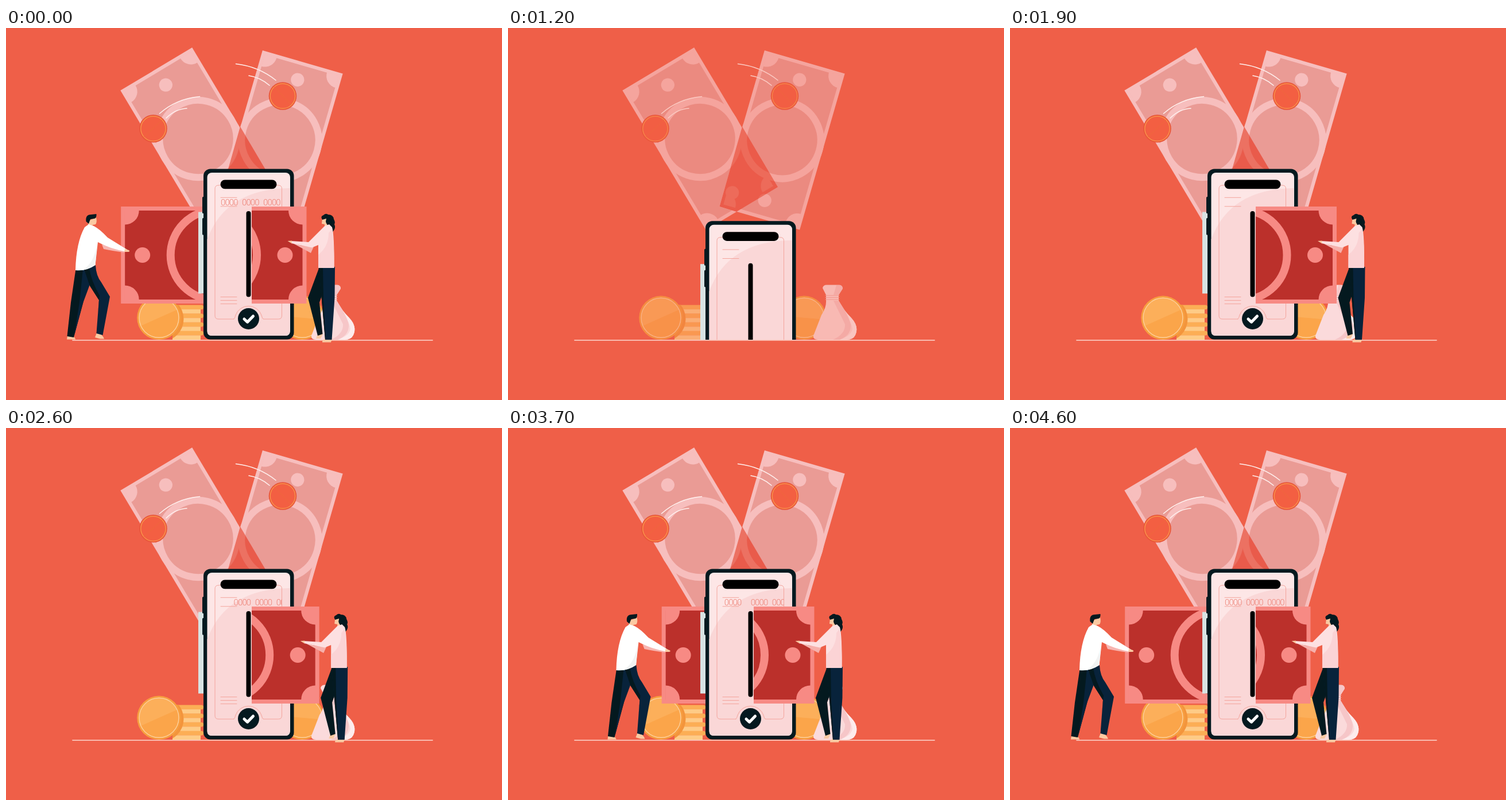
An HTML page that plays this animation: 864x648 px, repeating every 6.7 s.

```html
<!DOCTYPE html>
<html lang="en">
<head>
<meta charset="utf-8">
<title>Mobile cash</title>
<style>
html, body { margin: 0; width: 100%; height: 100%; overflow: hidden; background: #ef5f48; }
svg { display: block; width: 100%; height: 100%; }
text { font: 300 15px Roboto, sans-serif; letter-spacing: -.92px; word-spacing: 4.7px; fill: #ee8478; }
</style>
</head>
<body>
<script>
const INK = '#04191f', NAVY = '#08233b', SKIN = '#fbc9a2';
const CASH = ['#bb302b', '#f78a84'], PALE = ['#ea9b95', '#f7bebd'];

const path = (d, fill) => `<path d="${d}" fill="${fill}"/>`;
const line = (d, color, width = 1) =>
  `<path d="${d}" fill="none" stroke="${color}" stroke-width="${width}" stroke-linecap="round" stroke-linejoin="round"/>`;
const rect = (x, y, w, h, r, fill) =>
  `<rect x="${x}" y="${y}" width="${w}" height="${h}" rx="${r}" fill="${fill}"/>`;
const dot = (x, y, r, fill) => `<circle cx="${x}" cy="${y}" r="${r}" fill="${fill}"/>`;
const ring = (x, y, r, color, width) =>
  `<circle cx="${x}" cy="${y}" r="${r}" fill="none" stroke="${color}" stroke-width="${width}"/>`;

// Banknote centred on the origin
function marks(color) {
  const corners = [[1, 1], [1, -1], [-1, 1], [-1, -1]].map(([sx, sy]) =>
    `<path transform="scale(${sx} ${sy})" d="M-158 -78h25a24.5 24.5 0 0 1 -25 25z" fill="${color}"/>`).join('');
  return ring(0, 0, 78, color, 14) + corners + dot(-127, 0, 13.5, color) + dot(127, 0, 13.5, color);
}
const bill = ([fill, edge]) =>
  rect(-164.5, -84.5, 329, 169, 0, edge) + rect(-157.5, -77.5, 315, 155, 0, fill) + marks(edge);

const LEFT = 'translate(334.5 193) rotate(59.1) scale(.861)';
const RIGHT = 'translate(477.5 195.3) rotate(106.1) scale(.861)';
const at = (place, body) => `<g transform="${place}">${body}</g>`;

const backBills = at(LEFT, bill(PALE)) + at(RIGHT, bill(PALE)) +
  `<g clip-path="url(#cross)">${rect(360, 165, 115, 160, 0, '#e95b4b')}
   <g opacity=".35">${at(LEFT, marks('#f29a90'))}${at(RIGHT, marks('#f29a90'))}</g></g>`;

const flyingCoin = (x, y) => dot(x, y, 24.3, '#e8573a') + dot(x, y, 22.5, '#f35f42') +
  ring(x, y, 21.7, '#fa9a4c', 1.2);

const trails = ['M267.500 149Q297 123 337.500 119.500', 'M279 157Q295 141 315 140',
  'M400.500 62.500Q440 67 470 91', 'M423 83Q443 86 459 100']
  .map(d => line(d, '#fff0ee', 1.6)).join('');

function bigCoin(x, y, tilt) {
  return dot(x, y, 38.3, '#f79e40') + dot(x, y, 35, '#fcaf5a') +
    `<path transform="rotate(${tilt} ${x} ${y})" d="M${x - 35} ${y}a35 35 0 0 0 70 0z" fill="#fba54a"/>` +
    ring(x, y, 34.500, '#fdd09a', 1.4);
}

let stack = '';
for (let i = 0; i < 8; i++)
  stack += rect(290, 482.5 + i * 7.55, i % 2 ? 49 : 54, 7.7, i % 2 ? 0 : 3.5, i % 2 ? '#fecb86' : '#fcae55');
stack += '<g clip-path="url(#stackBox)">' + dot(270.5, 507, 39, '#f3953c') + '</g>';

const bag = path('M548 453Q549 447.500 555 447.500H577Q583 448 583 454L576 465V475Q584 491 598 505Q612 520 605 535Q601 543 590 543H540Q531 543 532 536L546 500Q555 487 554 474V465Z', '#fbdadb') +
  path('M576 475Q584 491 598 505Q612 520 605 535Q601 543 590 543H570Q597 540 600 524Q598 508 580 492Z', '#fdebec') +
  path('M572 448H577Q583 448 583 454L576 465H567ZM567 475L576 475Q598 508 597 520Q596 536 578 543H566Q588 533 587 516Z', '#f6c6c8') +
  line('M553 466H577M553 469.500H577M553 473H577', '#f3a9a7', 1.1);

const THIN = '#f4a49c';
const phone = rect(335, 320.5, 12, 142, 0, '#d8e3e3') +
  rect(342, 294, 6, 29, 1.5, INK) + rect(342, 331, 6, 29.5, 1.5, INK) +
  rect(344, 245.5, 157.5, 297, 12, INK) + rect(350.5, 252, 144.5, 284, 8, '#fde6e6') +
  path('M350.500 368Q383 280 494.500 279V528Q494.500 536 487 536H358Q350.500 536 350.500 528Z', '#fad7d7') +
  line('M397 507H370Q364 507 364 501V280Q364 274 370 274H474.500Q480.500 274 480.500 280V501Q480.500 507 474.500 507H448Q446 505 445 500A24 24 0 0 0 400 500Q399 505 397 507', THIN) +
  rect(373.5, 264.5, 98, 15.7, 7.8, '#000') +
  line('M374 295.300H402M374 310.800H402M374 468.500H402M374 474.500H402M374 480.500H402', THIN) +
  rect(418.5, 319, 8, 149.5, 4, '#000') +
  dot(422.5, 506.5, 18.5, INK) + line('M415 507L420.500 512.200L430.500 502', '#fff', 5);

const man =
  path('M107 536L106 542.500H121Q121 540 117 537ZM158 531L155 539L164 541.500H171Q170 538 166 534Z', SKIN) +
  path('M121.500 420H146L134 480L118 539L106.500 537L113 478Z', INK) +
  path('M134 420H152L146 447L133 482L119 535L128 478Z', NAVY) +
  path('M136 420L156 413Q157 432 166 443L181 468L168.500 535L157.500 532L162 474L146 449Z', NAVY) +
  path('M136 420L145 418Q148 440 163 466L160 500L157.500 532L162 474L146 449Z', INK) +
  path('M167 377L208 388L206 391Q184 388 170 385Z', '#f7b5b0') +
  path('M143 336L157 330Q159 338 156 342L151 343L150 347L143 346Z', SKIN) +
  path('M139.500 337Q138 325 148 325L157.500 324Q158 331 154 332L147 333L144 341Z', INK) +
  path('M144 342L153 345Q163 350 177 365L211 386L210 390Q180 384 160 373L155.500 413Q140 424 121 422Q122 374 137 347Z', '#fff') +
  path('M157 385L159 373L155.500 413Q146 419 133 422Q151 411 157 385Z', '#f2f3f3') +
  path('M207 384.500L214 387Q217 389 213 390L206 390Z', SKIN);

const woman =
  path('M543 533L540 541H548L552 533ZM556 541L551 545.500V547.500H566L568 541Z', SKIN) +
  path('M546 416H562L554 455L546 478L551.500 533L543 536L526 470Z', INK) +
  path('M544.500 416H573L572.500 470L567.500 543H556L550 474Z', NAVY) +
  path('M544.500 416H552L553 474L557 543H556L550 474Z', INK) +
  path('M498 374L519 380L536 381L531 392Z', '#f6b0ab') +
  path('M551 332L561 331L563 346L555 347L555 342L550 341Z', SKIN) +
  path('M551 334Q547 328 553 326Q557 322 561 325Q570 325 571 333Q574 338 572 342Q575 348 570 354Q567 358 565 352Q562 349 565 345Q558 344 557 337L558 332Z', INK) +
  path('M555 345L563 342L568 347Q572 360 571.500 418H544V378L533 382.500L497 375V371L527 373Z', '#fde0e1') +
  path('M562 357Q562 381 544 395V418H571.500Q572 378 568 350Z', '#fbd3d5') +
  path('M490.500 371L498 370.500V375.500Z', SKIN);

document.body.innerHTML = `
<svg viewBox="0 0 864 648" preserveAspectRatio="none">
  <defs>
    <clipPath id="cross"><path d="M408 172L470 277L398 320L368.500 311Z"/></clipPath>
    <clipPath id="stackBox"><rect x="290" y="482" width="54" height="61"/></clipPath>
    <clipPath id="ground"><rect width="864" height="543"/></clipPath>
    <clipPath id="behind"><rect width="350" height="648"/></clipPath>
    <clipPath id="front"><rect x="428" width="436" height="648"/></clipPath>
    <clipPath id="number"><rect x="371.500" y="290" width="109" height="24"/></clipPath>
  </defs>
  <g id="scene">
    ${backBills}${flyingCoin(256.5, 175.3)}${flyingCoin(482, 118.5)}
    ${line('M240 190L272 160M467 102L497 134', '#ee6a3c', .8)}${trails}
    ${stack}${bigCoin(266.5, 504.8, -24)}${bigCoin(516, 504.8, 5)}${bag}
  </g>
  ${line('M116 543.800H743', '#fbc7bc', 1.7)}
  <g clip-path="url(#behind)"><g id="manBill">${bill(CASH)}</g></g>
  <g clip-path="url(#ground)"><g id="phone">${phone}</g></g>
  <g clip-path="url(#number)"><g id="digits">
    <text x="-157" y="308.500">0000 0000 0000 0000</text><text y="308.500">0000 0000 0000 0000</text>
  </g></g>
  <g clip-path="url(#front)"><g id="womanBill">${bill(CASH)}</g></g>
  <g id="woman">${woman}</g>
  <g id="man">${man}</g>
</svg>`;

const el = id => document.getElementById(id);
const move = (id, x, y = 0) => el(id).setAttribute('transform', `translate(${x} ${y})`);
const show = (ids, on) => ids.forEach(id => el(id).setAttribute('display', on ? 'inline' : 'none'));
const unit = v => Math.min(1, Math.max(0, v));

function draw(now) {
  const step = Math.floor(now % 6700 / 100);      // ten poses per second
  const n = step < 1 ? 46 : Math.min(step, 46);
  const left = 46 - n;

  el('scene').setAttribute('opacity', unit((n - .1) / 16.2));
  move('phone', 0, 297.5 * (1 - unit((n - .6) / 16.4)));

  const womanX = Math.max(45.5 - 7 * (n - 19), 1.11 * left);
  move('woman', womanX);
  move('womanBill', 359 + womanX, 395.5);
  show(['woman', 'womanBill'], n >= 17);

  const manX = 7.5 * left;
  move('man', manX);
  move('manBill', 364.7 + manX, 395.5);
  show(['man', 'manBill'], n >= 29);

  move('digits', 337 + 8.45 * left + .119 * left * left);
  show(['digits'], n >= 20);

  requestAnimationFrame(draw);
}
draw(0);
</script>
</body>
</html>
```
